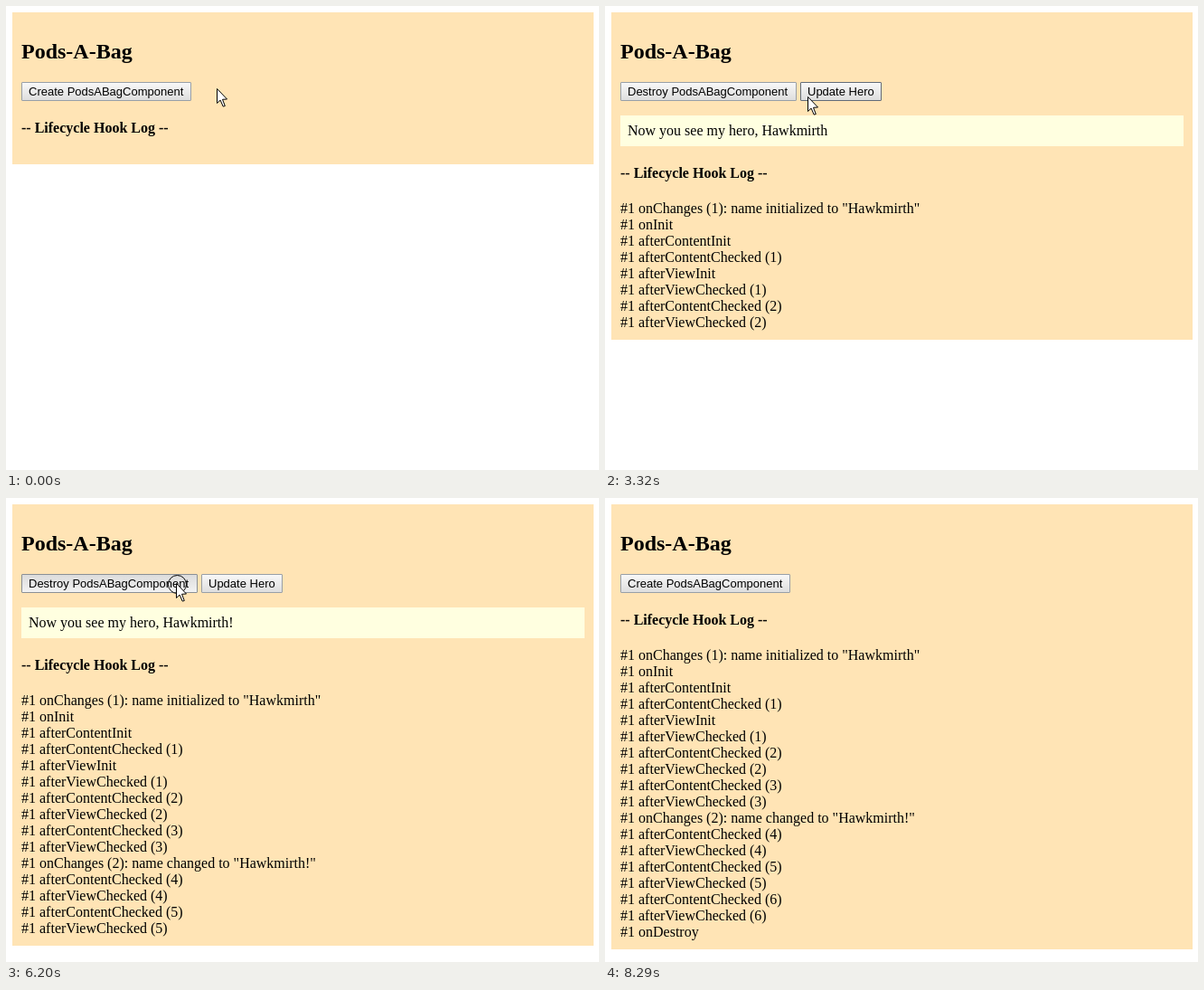
An HTML page with a canvas that plays this animation: 656x513 px, repeating every 9.02 s.

```html
<!DOCTYPE html>
<html lang="en">
<head>
<meta charset="utf-8">
<title>Lifecycle hooks</title>
<style>
  html, body { margin: 0; width: 100%; height: 100%; overflow: hidden; background: #fff; }
  #box {
    position: absolute; left: 7px; top: 7px; width: 643px; box-sizing: border-box;
    padding: 10px; background: #ffe4b5; color: #000; display: flow-root; font-kerning: none;
    font: 16px/18px "Liberation Serif", "Times New Roman", serif;
  }
  h2 { margin: 20px 0 0; font-size: 24px; line-height: 27px; }
  h4 { margin: 21px 0 0; font-size: 16px; line-height: 18px; }
  #row { margin-top: 20px; height: 21px; display: flex; gap: 4px; }
  button {
    height: 21px; box-sizing: border-box; margin: 0; padding: 0 7px; text-align: left;
    border: 1px solid #989fa7; border-radius: 1px; color: #000; white-space: nowrap;
    background: linear-gradient(#f8f8f8, #dedede); pointer-events: none; font-kerning: none;
    font: 13px/19px "Liberation Sans", Arial, sans-serif;
  }
  button.hover { border-color: #626c78; }
  button.down { border-color: #8a9096; background: linear-gradient(#dcdcdc, #f2f2f2); }
  #toggle { width: 188px; }
  .alive #toggle { width: 195px; }
  #update { width: 90px; }
  #hero { margin: 16px 0 0; padding: 8px; background: #ffffe0; }
  #box:not(.alive) :is(#update, #hero) { display: none; }
  #log { margin-top: 21px; white-space: pre; }
  canvas { position: absolute; left: 0; top: 0; }
</style>
</head>
<body>
<div id="box">
  <h2>Pods-A-Bag</h2>
  <div id="row"><button id="toggle"></button><button id="update">Update Hero</button></div>
  <p id="hero"></p>
  <h4>-- Lifecycle Hook Log --</h4>
  <div id="log"></div>
</div>
<canvas id="top" width="656" height="513"></canvas>
<script>
const LOOP = 9020, HERO = 'Hawkmirth';
const CREATE = 1780, UPDATE = 3720, DESTROY = 6350;   // when each click takes effect
const BEAM = 5680, EXIT = 7470, GONE = 8290;
const PRESS = 150, STEP = 120, EXIT_STEP = 140, EXIT_COUNT = 6;

const $ = id => document.getElementById(id);
const box = $('box'), toggle = $('toggle'), update = $('update'), hero = $('hero'), log = $('log');
const ctx = $('top').getContext('2d');

const checked = n => [`afterContentChecked (${n})`, `afterViewChecked (${n})`];
const started = [
  `onChanges (1): name initialized to "${HERO}"`, 'onInit',
  ...['Content', 'View'].flatMap(s => [`after${s}Init`, `after${s}Checked (1)`]),
  ...checked(2)
];
const updated = [
  ...checked(3), `onChanges (2): name changed to "${HERO}!"`, ...checked(4), ...checked(5)
];
const destroyed = [...checked(6), 'onDestroy'];

// pointer glides: start time, steps, end point
const glides = [
  [680, 2, 213, 96], [950, 2, 178, 98], [2800, 3, 215, 99], [3200, 2, 224, 100],
  [BEAM, 1, 215, 98], [BEAM + STEP, 2, 188, 94]
];

const stepAt = (t, start, size, count) =>
  Math.max(0, Math.min(1, (Math.floor((t - start) / size) + 1) / count));

function pointerAt(t) {
  let x = 233, y = 91;
  for (const [start, count, toX, toY] of glides) {
    const k = stepAt(t, start, STEP, count);
    x += (toX - x) * k;
    y += (toY - y) * k;
  }
  // the exit bends: down first, then to the right
  const k = stepAt(t, EXIT, EXIT_STEP, EXIT_COUNT), s = k * k * (3 - 2 * k);
  x += (561 - x) * s * s;
  y += (503 - y) * s;
  return [Math.round(x), Math.round(y)];
}

function drawArrow(x, y) {
  const pts = [[0, 0], [0, 16], [3.6, 12.6], [6.7, 19.6], [8.8, 19], [6, 11.8], [11, 11.5]];
  ctx.beginPath();
  for (const [px, py] of pts) ctx.lineTo(x + px + .5, y + py + .5);
  ctx.closePath();
  ctx.fillStyle = '#fff';
  ctx.fill();
  ctx.stroke();
}

function drawBeam(x, y) {
  ctx.fillStyle = '#000';
  for (const dy of [-8, 7]) {
    ctx.fillRect(x - 3, y + dy, 3, 1);
    ctx.fillRect(x + 1, y + dy, 3, 1);
  }
  ctx.fillRect(x, y - 7, 1, 14);
}

function drawRing(x, y) {
  ctx.beginPath();
  ctx.arc(x + 1.5, y + 1.5, 10, 0, 2 * Math.PI);
  ctx.stroke();
}

function setText(el, text) {
  if (el.textContent !== text) el.textContent = text;
}

function setButton(el, x, y, pressed) {
  const r = el.getBoundingClientRect();
  const over = x >= r.left && x < r.right && y >= r.top && y < r.bottom;
  el.className = !over ? '' : pressed ? 'down' : 'hover';
}

function render(t) {
  const alive = t >= CREATE && t < DESTROY;
  const lines = [
    ...(t >= CREATE ? started : []),
    ...(t >= UPDATE ? updated : []),
    ...(t >= DESTROY ? destroyed : [])
  ];
  box.className = alive ? 'alive' : '';
  setText(toggle, `${alive ? 'Destroy' : 'Create'} PodsABagComponent`);
  setText(hero, `Now you see my hero, ${HERO}${t >= UPDATE ? '!' : ''}`);
  setText(log, lines.map(s => '#1 ' + s).join('\n'));

  const [x, y] = pointerAt(t);
  const pressed = [CREATE, DESTROY].some(end => t >= end - PRESS && t < end);
  setButton(toggle, x, y, pressed);
  setButton(update, x, y, pressed);

  ctx.clearRect(0, 0, 656, 513);
  if (t >= GONE) return;
  if (pressed) drawRing(x, y);
  if (t >= BEAM && t < BEAM + STEP) drawBeam(x, y);
  else drawArrow(x, y);
}

function frame() {
  render(performance.now() % LOOP);
  requestAnimationFrame(frame);
}
frame();
</script>
</body>
</html>
```
